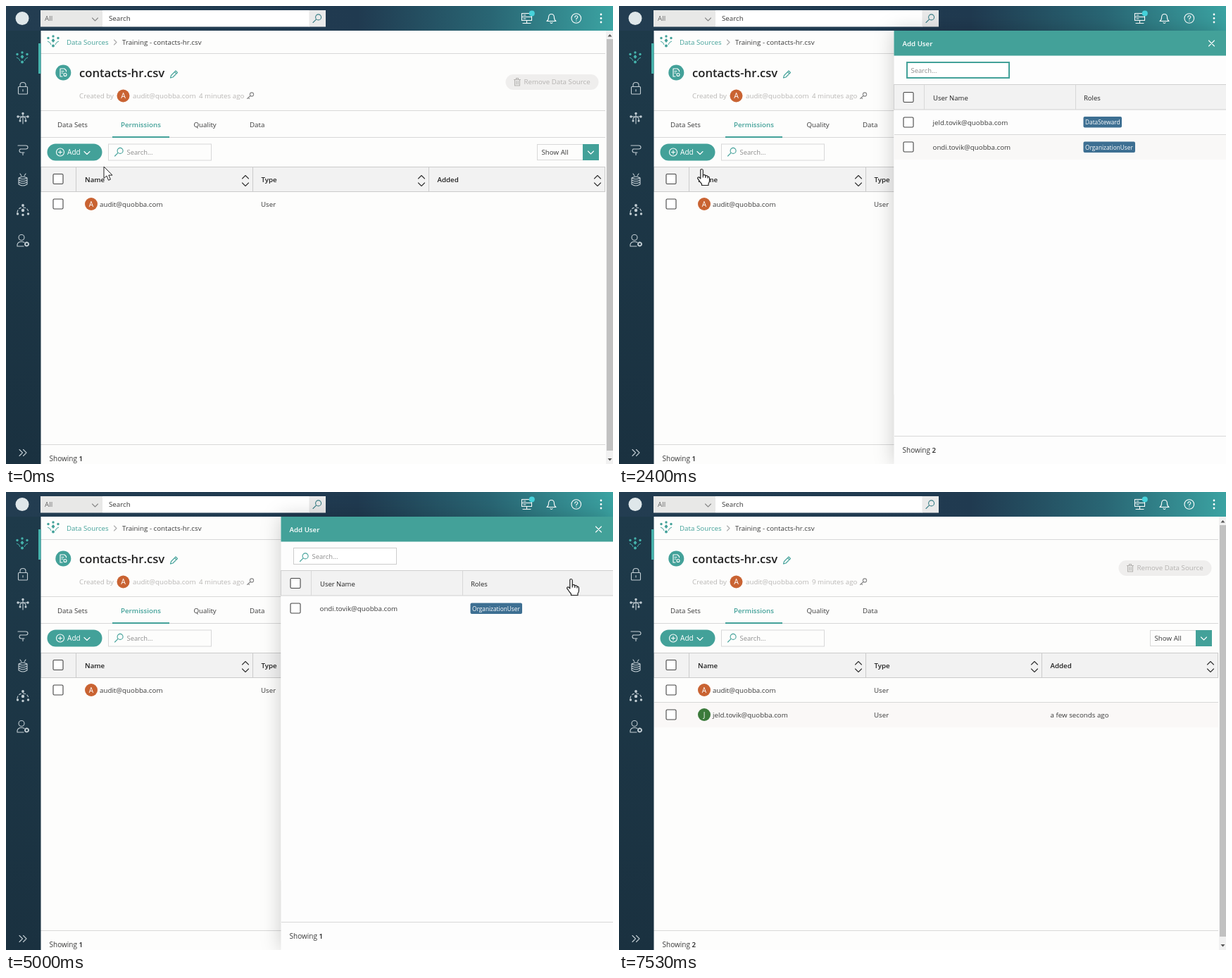
Animation, 862 px wide and 650 px high, one loop 7600 ms. Source, as an HTML page:

```html
<!DOCTYPE html>
<html lang="en">
<head>
<meta charset="utf-8">
<title>Grant access</title>
<style>
html, body { margin: 0; width: 100%; height: 100%; overflow: hidden; background: #fdfdfc }
svg { display: block }
#stage { width: 862px; height: 650px; font: 9.75px "Open Sans", "Noto Sans", sans-serif; --teal: #43a199; --blue: #3d6f92 }
text { fill: #3a3a3a; white-space: pre }
.b { font-weight: 600; fill: #222 }
.w { fill: #fff }
.g { fill: #b9b7b5 }
.p { fill: #8d8d8d; font-size: 9.4px }
.teal { fill: var(--teal) }
.blue { fill: var(--blue) }
.ln { fill: none; stroke: #d8d8d8 }
.ic { fill: none; stroke-width: 1.1; stroke-linecap: round; stroke-linejoin: round }
.st { stroke: var(--teal) }
.sw { stroke: #fff }
.sd { stroke: #333 }
.ss { stroke: #c3ced4 }
.box { fill: #fff; stroke: #444; stroke-width: 1.1 }
.badge { fill: #fff; font-size: 8.3px }

/* one 7.6 s loop; 1% = 76 ms */
.m, .k { animation: 7.6s linear infinite }
.k { animation-timing-function: step-end }

#cursor { animation-name: cursor; animation-timing-function: ease-in-out }
@keyframes cursor {
  0%, 1.71% { transform: translate(139px, 228px) }
  6.58%, 20.13% { transform: translate(118px, 198px) }
  22.89%, 34.21% { transform: translate(118px, 232px) }
  44.21%, 52.11% { transform: translate(409px, 164px) }
  59.61%, 76.32% { transform: translate(803px, 124px) }
  80%, 100% { transform: translate(885px, 112px) }
}
#arrow { animation-name: arrow }
@keyframes arrow { 0%, 34.74%, 52.63%, 76.71% { opacity: 1 } 4.34%, 43.16%, 58.55% { opacity: 0 } }
#hand { animation-name: hand }
@keyframes hand { 0%, 34.74%, 52.63%, 76.71% { opacity: 0 } 4.34%, 43.16%, 58.55% { opacity: 1 } }

#add { animation-name: add }
@keyframes add { 0%, 24.08% { fill: #43a199 } 4.34% { fill: #2e7d76 } }
#menu { animation-name: menu }
@keyframes menu { 0%, 9.47%, 25%, 100% { opacity: 0 } 10.79%, 23.42% { opacity: 1 } }
#hover { animation-name: hover }
@keyframes hover { 0%, 25% { opacity: 0 } 20.13% { opacity: 1 } }

#panel { animation-name: panel; animation-timing-function: ease-out }
@keyframes panel {
  0%, 24.08%, 75.26%, 100% { transform: translateX(520px) }
  28.03%, 72.76% { transform: none }
}
#ring { animation-name: ring }
@keyframes ring { 0% { opacity: 1 } 43.82% { opacity: 0 } }
#caret { animation-name: caret }
@keyframes caret { 0%, 31.58%, 43.82% { opacity: 0 } 25%, 38.16% { opacity: 1 } }
#typing { animation-name: typing }
@keyframes typing { 0% { opacity: 1 } 44.74% { opacity: 0 } }
#idle { animation-name: idle }
@keyframes idle { 0% { opacity: 0 } 44.74% { opacity: 1 } }
#rowHover { animation-name: rowHover }
@keyframes rowHover { 0%, 46.84% { opacity: 0 } 44.74% { opacity: 1 } }
#tickBox { animation-name: idle }
#tick { animation-name: tick }
@keyframes tick { 0%, 44.74% { opacity: 0 } 45.13% { opacity: .15 } 47.37%, 100% { opacity: 1 } }
#list { animation-name: list; animation-timing-function: ease-in-out }
@keyframes list { 0%, 45.3%, 65.79%, 100% { transform: none } 49.08%, 63.95% { transform: translateY(31.5px) } }
#bar { animation-name: bar }
@keyframes bar { 0%, 65.79% { opacity: 0 } 45.3% { opacity: 1 } }
#under { animation-name: under }
@keyframes under { 0% { opacity: 0 } 58.55% { opacity: 1 } }
.before { animation-name: before }
@keyframes before { 0% { opacity: 1 } 64.87% { opacity: 0 } }
.after { animation-name: after }
@keyframes after { 0% { opacity: 0 } 64.87% { opacity: 1 } }
#second { animation-name: second }
@keyframes second { 0% { transform: none } 64.87% { transform: translateY(-35px) } }

#age4 { animation-name: age4 }
@keyframes age4 { 0% { opacity: 1 } 73.68% { opacity: 0 } }
#age9 { animation-name: age9 }
@keyframes age9 { 0% { opacity: 0 } 73.68% { opacity: 1 } }
#count1 { animation-name: count1 }
@keyframes count1 { 0% { opacity: 1 } 78.95% { opacity: 0 } }
.granted { animation-name: granted }
@keyframes granted { 0% { opacity: 0 } 78.95% { opacity: 1 } }

#toast { animation-name: toast }
@keyframes toast { 0%, 73.16%, 98.68%, 100% { opacity: 0 } 75%, 96.45% { opacity: 1 } }
#progress { transform-origin: 605px 0; animation-name: progress }
@keyframes progress { 0%, 80.26% { transform: none } 99.21%, 100% { transform: scaleX(0) } }
</style>
</head>
<body>
<svg id="stage" viewBox="0 0 862 650">
<defs>
  <linearGradient id="top"><stop stop-color="#233d51"/><stop offset=".58" stop-color="#203a50"/><stop offset=".8" stop-color="#296674"/><stop offset="1" stop-color="#3ba3a2"/></linearGradient>
  <linearGradient id="side" x2="0" y2="1"><stop stop-color="#1e3a4a"/><stop offset="1" stop-color="#1a3140"/></linearGradient>
  <g id="glass"><circle cx="1.6" cy="-1.6" r="4"/><path d="M-1.4 1.4-6 6"/></g>
  <path id="down" d="M-4-2 0 2 4-2"/>
  <path id="cross" d="M-4-4 4 4M4-4-4 4"/>
  <path id="sort" d="M-4.5-2.5 0-7 4.5-2.5M-4.5 3.5 0 8 4.5 3.5"/>
  <rect id="check" x="-7" y="-7" width="14" height="14" rx="1.5"/>
  <g id="fan">
    <path d="M-8 0Q-4 1-3 5M8 0Q4 1 3 5" fill="none"/>
    <g stroke="none"><circle cx="-7" cy="-4.5" r="1.7"/><circle cy="-7" r="1.7"/><circle cx="7" cy="-4.5" r="1.7"/><path d="M0-4 2.5-1 0 2-2.5-1Z"/><circle cy="6.5" r="2"/></g>
  </g>
  <g id="user"><circle cy="-3" r="3.6"/><path d="M-5.5 6.5V5Q-5 1.7 0 1.7T5.5 5V6.5"/></g>
</defs>

<rect width="862" height="650" fill="#fdfdfc"/>

<!-- page -->
<g class="ln">
  <path d="M49 67.5H851M49 148.5H851M49 186.5H851M49 622.5H851"/>
  <rect x="49.5" y="228.5" width="801" height="35" fill="#f2f2f2" stroke="#cbcbcb"/>
  <path d="M99.5 228V263M350.5 228V263M600.5 228V263" stroke="#cbcbcb"/>
</g>
<use href="#fan" x="67" y="50" class="st teal"/>
<text x="86" y="54.5" class="teal">Data Sources</text>
<path d="M153.5 48 157 51.5 153.5 55" class="ic" stroke="#aaa"/>
<text x="165" y="54.7">Training - contacts-hr.csv</text>

<circle cx="81.300" cy="94.500" r="11" class="teal"/>
<path d="M85.500 93V91.500L83 89H77V100H80M79 92.500H82M79 95H81" class="ic sw"/>
<circle cx="84" cy="97.500" r="2" class="ic sw"/>
<text x="104" y="101" class="b" style="font-size:16.7px">contacts-hr.csv</text>
<path d="M233.500 102 234.500 98.500 241 92 243.500 94.500 237 101ZM239.500 93.500 242 96" class="ic st"/>
<text x="104" y="131" class="g">Created by</text>
<circle cx="166.500" cy="127.500" r="9" fill="#c96332"/>
<text x="166.500" y="131.200" text-anchor="middle" class="w" style="font-size:10.5px">A</text>
<text x="180" y="131" class="g">audit@quobba.com</text>
<text x="274" y="131" class="g k" id="age4">4 minutes ago</text>
<text x="274" y="131" class="g k" id="age9">9 minutes ago</text>
<path d="M347 127.500 342.500 131.500M344 130 345.500 131.500" class="ic" stroke="#888"/>
<circle cx="349" cy="125.500" r="2.600" class="ic" stroke="#888"/>

<rect x="709.500" y="97" width="132" height="22" rx="11" fill="#efeeed"/>
<path d="M721.500 104.500H730.500M724.500 104V102.500H727.500V104M722.500 105V113H729.500V105M724.800 106.500V111M727.200 106.500V111" class="ic" stroke="#b4b2b0"/>
<text x="735.500" y="111.300" fill="#b4b2b0" style="fill:#b4b2b0">Remove Data Source</text>

<text x="73" y="171.500">Data Sets</text>
<text x="163" y="171.500" class="b teal" style="fill:var(--teal)">Permissions</text>
<text x="266.500" y="171.500">Quality</text>
<text x="346" y="171.500">Data</text>
<rect x="151" y="185" width="81" height="2" class="teal"/>

<rect id="add" x="58.500" y="195.500" width="78" height="24" rx="12" class="teal k"/>
<g class="ic sw"><circle cx="77" cy="207.500" r="5.500"/><path d="M74.500 207.500H79.500M77 205V210"/><use href="#down" x="115" y="208.500"/></g>
<text x="87" y="211" class="w" style="font-size:10.1px">Add</text>
<rect x="145.500" y="196" width="146" height="23" class="ln"/>
<use href="#glass" x="160.500" y="207" class="ic st"/>
<text x="171.500" y="211" class="p">Search...</text>
<rect x="754.500" y="196.500" width="87" height="22" class="ln" stroke="#ccc"/>
<text x="760.500" y="211">Show All</text>
<rect x="819" y="196" width="23" height="23" class="teal"/>
<use href="#down" x="830.500" y="208" class="ic sw"/>

<use href="#check" x="74" y="245.500" class="box"/>
<text x="112" y="250" class="b">Name</text>
<text x="362.500" y="250" class="b">Type</text>
<text x="612.500" y="250" class="b">Added</text>
<g class="ic sd"><use href="#sort" x="340" y="247.500"/><use href="#sort" x="590" y="247.500"/><use href="#sort" x="840" y="247.500"/></g>

<use href="#check" x="74" y="281" class="box"/>
<circle cx="121" cy="281" r="9" fill="#c96332"/>
<text x="121" y="284.700" text-anchor="middle" class="w" style="font-size:10px">A</text>
<text x="133" y="285">audit@quobba.com</text>
<text x="362" y="285">User</text>

<g class="granted k">
  <rect x="50" y="299" width="801" height="35" fill="#faf8f7"/>
  <path d="M50 298.500H851" class="ln"/>
  <use href="#check" x="74" y="316" class="box"/>
  <circle cx="121" cy="316" r="9" fill="#3b7a3b"/>
  <text x="121" y="319.700" text-anchor="middle" class="w" style="font-size:10px">J</text>
  <text x="133" y="320">jeld.tovik@quobba.com</text>
  <text x="362" y="320">User</text>
  <text x="612.500" y="320">a few seconds ago</text>
</g>

<text x="61.500" y="645.700" style="font-size:10px">Showing</text>
<text x="103.500" y="645.700" class="b k" id="count1">1</text>
<text x="103.500" y="645.700" class="b granted k">2</text>

<rect x="852" y="35" width="10" height="615" fill="#f1f1f1"/>
<rect x="853" y="47" width="9" height="584" fill="#c1c1c1"/>
<path d="M854.500 43.500 857.500 40 860.500 43.500ZM854.500 642 857.500 645.500 860.500 642Z" fill="#555"/>

<g id="menu" class="m">
  <rect x="58" y="220" width="133" height="52" fill="#fff" style="filter:drop-shadow(0 2px 3px rgba(0,0,0,.25))"/>
  <rect id="hover" x="58" y="220" width="133" height="26" fill="#f2f9fa" class="k"/>
  <g class="ic st"><use href="#user" x="70.500" y="233.500"/><use href="#user" x="69.500" y="258"/></g>
  <circle cx="74" cy="262.500" r="2" fill="#fff" class="st"/>
  <text x="82" y="236">Add Users</text>
  <text x="82" y="262">Add Roles</text>
</g>

<!-- navigation -->
<rect width="862" height="35" fill="url(#top)"/>
<rect y="35" width="49.500" height="615" fill="url(#side)"/>
<rect x="46" y="53" width="3.500" height="43" fill="#45b3ac"/>
<circle cx="23" cy="17.500" r="9.500" fill="#dfe7ea"/>
<rect x="49" y="6" width="88" height="23.500" fill="#e8e8e7"/>
<rect x="137" y="6" width="294" height="23.500" fill="#fff"/>
<rect x="430.500" y="6" width="23.500" height="23.500" fill="#eaeaea"/>
<text x="55" y="21" style="fill:#666">All</text>
<use href="#down" x="126.500" y="19" class="ic" stroke="#888"/>
<text x="146" y="21.300">Search</text>
<use href="#glass" x="442" y="17.500" class="ic" stroke="#3d8088"/>

<g class="ic sw">
  <rect x="732.500" y="10.500" width="14" height="5"/><rect x="732.500" y="15.500" width="14" height="5"/>
  <path d="M739.500 20.500V24M734 24.500H745M735 13H738M735 18H738"/>
  <path d="M768 21.500Q770.500 20 770.500 16.500 770.500 11.500 774.500 11.500T778.500 16.500Q778.500 20 781 21.500ZM773 23.500Q774.500 25.500 776 23.500"/>
  <circle cx="809.800" cy="17.500" r="6.800"/>
  <path d="M807.800 16Q808 13.800 809.900 13.800T811.900 15.800Q811.800 16.700 809.900 18V19M809.900 21V21.200"/>
</g>
<circle cx="746.800" cy="10.500" r="4" fill="#46d3db"/>
<g class="w"><circle cx="845" cy="12" r="1.400"/><circle cx="845" cy="17.500" r="1.400"/><circle cx="845" cy="23" r="1.400"/></g>

<use href="#fan" x="23" y="73" fill="#45b3ac" stroke="#45b3ac"/>
<g class="ic ss" transform="translate(24 0)">
  <rect x="-6.500" y="114.500" width="13" height="10.500" rx="1"/><path d="M-4 114.500V112Q-4 108.500 0 108.500T4 112V114.500M0 118.500V121"/>
  <path d="M0 153V167M-7 157H7M-4 162V160.500Q-4 158 0 157 4 158 4 160.500V162"/>
  <path d="M-7 198H4Q7 198 7 200.500T4 203H-3Q-5 203-5 205.500T-2 208H2M0 208V211.500M-4 203H4"/>
  <path d="M-6 244V253Q0 257 6 253V244Q0 247.500-6 244ZM-6 247Q0 250.500 6 247M-6 250Q0 253.500 6 250M-6 244Q0 240.500 6 244M-4 238 -2 241M4 238 2 241"/>
  <path d="M-8 293Q-7 286 0 286T8 293" stroke-dasharray="3 3"/>
  <circle cx="-2" cy="328.500" r="4"/><path d="M-8 341V338.500Q-7 334.500-2 334.500 0 334.500 2 335.500M-8 341H1"/><circle cx="5.500" cy="338" r="2.500" stroke-width="2" stroke-dasharray="1.600 1"/>
  <path d="M-5 629.500-.5 634-5 638.500M.5 629.500 5 634 .5 638.500"/>
</g>
<g fill="#c3ced4"><circle cx="24" cy="152.500" r="1.700"/><circle cx="17" cy="157" r="1.700"/><circle cx="31" cy="157" r="1.700"/><circle cx="20" cy="163" r="1.500"/><circle cx="28" cy="163" r="1.500"/><circle cx="24" cy="283" r="1.900"/><circle cx="24" cy="290" r="2.200"/><circle cx="16.500" cy="295" r="1.700"/><circle cx="24" cy="296.500" r="1.700"/><circle cx="31.500" cy="295" r="1.700"/></g>

<!-- side panel -->
<g id="panel" class="m">
  <rect x="390.500" y="35" width="472" height="615" fill="#fdfdfd" style="filter:drop-shadow(0 0 14px rgba(0,0,0,.2))"/>
  <rect x="390.500" y="35" width="472" height="35.500" class="teal"/>
  <text x="402.500" y="57" class="b w" style="fill:#fff">Add User</text>
  <use href="#cross" x="841.500" y="53" class="ic sw"/>

  <rect x="408.500" y="79.500" width="146" height="23" fill="#fff" stroke="#ccc"/>
  <rect id="ring" x="409" y="80" width="145" height="22" fill="none" stroke-width="2" class="st k"/>
  <text id="typing" x="414.500" y="94.500" class="p k">Search...</text>
  <g id="idle" class="k"><use href="#glass" x="423.500" y="92.500" class="ic st"/><text x="434.500" y="94.500" class="p">Search...</text></g>
  <rect id="caret" x="415" y="83" width="1" height="15" fill="#222" class="k"/>

  <g id="bar" class="k">
    <rect x="390.500" y="111" width="472" height="33" class="blue"/>
    <use href="#cross" x="404" y="127" class="ic sw"/>
    <text x="416" y="131" class="w">1 item selected</text>
    <text x="789.500" y="131" class="w">Grant access</text>
    <path id="under" d="M790 132.500H847" class="sw k"/>
  </g>

  <g id="list" class="m">
    <rect x="390.500" y="111.500" width="472" height="440" fill="#fdfdfd"/>
    <rect x="390.500" y="111.500" width="474" height="35.500" fill="#f2f2f2" stroke="#d0d0d0"/>
    <path d="M433.500 112V147M648.500 112V147" class="ln"/>
    <use href="#check" x="411" y="129.500" class="box"/>
    <text x="446" y="133.500" class="b" style="font-size:9.5px;font-weight:500">User Name</text>
    <text x="660" y="133.500" class="b" style="font-size:9.5px;font-weight:500">Roles</text>

    <g class="before k">
      <rect x="391" y="183" width="471" height="35" fill="#f9f8f7"/>
      <rect id="rowHover" x="391" y="147.500" width="471" height="35" fill="#f1fafa" class="k"/>
      <path d="M391 182.500H862" class="ln" stroke="#e2e2e2"/>
      <use href="#check" x="411" y="165" class="box"/>
      <use id="tickBox" href="#check" x="411" y="165" fill="#fff" class="st k"/>
      <g id="tick" class="m"><use href="#check" x="411" y="165" class="teal st"/><path d="M407.500 165 410 167.500 414.500 162.500" class="ic sw"/></g>
      <text x="445.500" y="168.500">jeld.tovik@quobba.com</text>
      <rect x="659.500" y="157" width="54.500" height="15.500" rx="2" class="blue"/>
      <text x="662" y="168" class="badge">DataSteward</text>
    </g>
    <g id="second" class="k">
      <use href="#check" x="411" y="200" class="box"/>
      <text x="445.500" y="204">ondi.tovik@quobba.com</text>
      <rect x="659.500" y="192.500" width="73.500" height="15.500" rx="2" class="blue"/>
      <text x="662" y="203.500" class="badge">OrganizationUser</text>
    </g>
  </g>

  <path d="M391 610.500H862" class="ln"/>
  <text x="402.500" y="634" style="font-size:10px">Showing</text>
  <text x="444.500" y="634" class="b before k">2</text>
  <text x="444.500" y="634" class="b after k">1</text>
</g>

<g id="toast" class="m">
  <rect x="605" y="579" width="229" height="47.500" rx="2" fill="#fff" style="filter:drop-shadow(0 1px 4px rgba(0,0,0,.25))"/>
  <text x="615.500" y="606.500" style="font:10.25px 'Liberation Sans',Arial,sans-serif;fill:#757575">User has been granted access</text>
  <path d="M819 588 826 595M826 588 819 595" class="ic" stroke="#888"/>
  <rect id="progress" x="605" y="623" width="229" height="3.500" class="teal m"/>
</g>

<g id="cursor" class="m" stroke-linejoin="round">
  <path id="arrow" class="k" d="M0 0V16.500L3.900 13 6.600 19.300 9.400 18.100 6.800 12.100H12Z" fill="#fff" stroke="#222"/>
  <g id="hand" class="k" stroke="#222" stroke-width="1.200">
    <path d="M-2.200 1.500Q-2.200-.5-.5-.5T1.300 1.500V8Q4 6.800 4.800 9 7.400 8 8 10.200 10.500 9.800 10.500 12.500V16Q10.500 18.500 9 20V22.500H-.5V20.500Q-3 18-5 14.500-7.500 12-5.500 11-4 10.300-2.200 13Z" fill="#fff"/>
    <path d="M1.300 8V11.500M4.800 9V12M8 10.200V12.500" fill="none"/>
  </g>
</g>
</svg>
</body>
</html>
```
